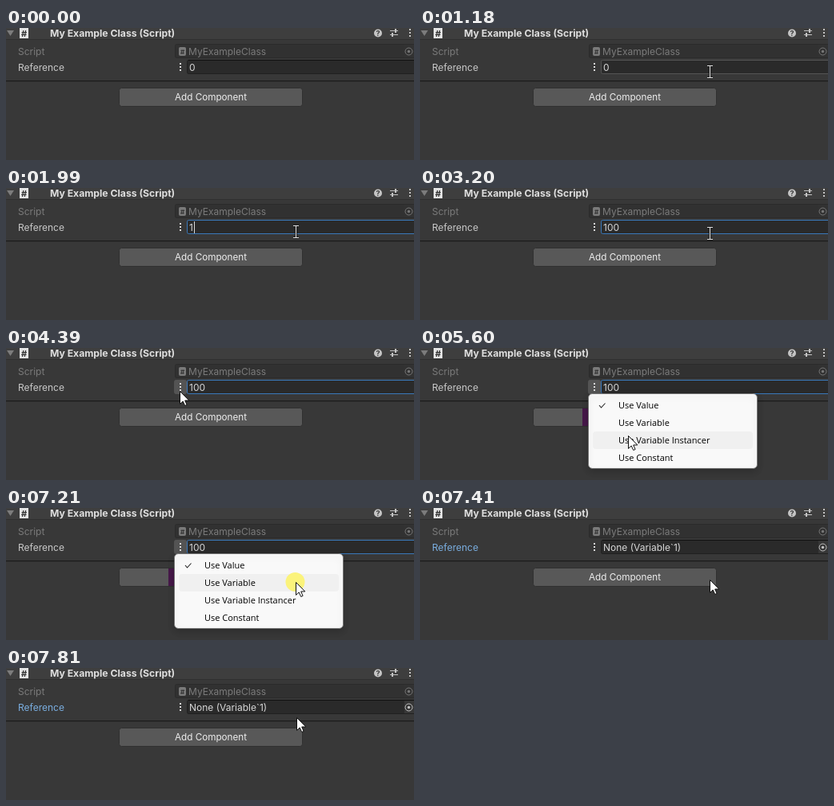
These frames come from a looping animation (510x166 px, 8 s). An HTML page with a canvas:

```html
<!DOCTYPE html>
<html lang="en">
<head>
<meta charset="utf-8">
<title>Inspector reference field</title>
<style>
html, body { margin: 0; width: 100%; height: 100%; overflow: hidden; background: #383838; }
canvas { display: block; }
</style>
</head>
<body>
<canvas id="stage" width="510" height="166"></canvas>
<script>
const ctx = document.getElementById('stage').getContext('2d');
const LOOP = 8000;
const UI = '12px Inter, sans-serif';
const MENU_FONT = '11px "Open Sans", "Noto Sans", sans-serif';
const MENU_ITEMS = ['Use Value', 'Use Variable', 'Use Variable Instancer', 'Use Constant'];

// Pointer samples: start time, x, y.
const POINTER = [
  [790, 430, 108], [990, 378, 74], [1180, 362, 55], [3200, 362, 57],
  [3400, 390, 70], [3590, 330, 78], [3790, 268, 76], [3990, 229, 66],
  [4190, 218, 59], [4390, 217, 54], [5200, 234, 82], [5400, 254, 104],
  [5600, 260, 110], [5800, 288, 107], [6010, 316, 101], [6210, 330, 96],
  [6410, 346, 95], [6610, 357, 94], [6810, 362, 93], [7410, 362, 90],
  [7610, 363, 72], [7810, 363, 62]
];
const VALUES = [[0, '0'], [1990, '1'], [2190, '10'], [2390, '100'], [7410, 'None (Variable`1)']];

const latest = (keys, t) => keys.filter(key => key[0] <= t).pop();

function rect(x, y, w, h, color) {
  ctx.fillStyle = color;
  ctx.fillRect(x, y, w, h);
}

function box(x, y, w, h, radius, fill, border = fill) {
  ctx.beginPath();
  ctx.roundRect(x + .5, y + .5, w - 1, h - 1, radius);
  ctx.fillStyle = fill;
  ctx.fill();
  ctx.lineWidth = 1;
  ctx.strokeStyle = border;
  ctx.stroke();
}

function disc(x, y, r, color) {
  ctx.beginPath();
  ctx.arc(x, y, r, 0, 2 * Math.PI);
  ctx.fillStyle = color;
  ctx.fill();
}

function ring(x, y, r, color) {
  ctx.beginPath();
  ctx.arc(x, y, r, 0, 2 * Math.PI);
  ctx.lineWidth = 1;
  ctx.strokeStyle = color;
  ctx.stroke();
}

function text(string, x, y, color, font = UI, align = 'left') {
  ctx.font = font;
  ctx.textAlign = align;
  ctx.fillStyle = color;
  ctx.fillText(string, x, y);
}

function line(points, color, width = 1) {
  ctx.beginPath();
  points.forEach(([x, y]) => ctx.lineTo(x, y));
  ctx.lineWidth = width;
  ctx.strokeStyle = color;
  ctx.stroke();
}

function dots(x, y, gap, color) {
  for (let i = -1; i <= 1; i++) rect(x - 1, y - 1 + i * gap, 2, 2, color);
}

function picker(y, color, fill) {
  rect(498, y - 8, 12, 16, fill);
  ring(503.5, y + .5, 4.5, color);
  disc(503.5, y + .5, 1.7, color);
}

function drawHeader() {
  rect(0, 0, 510, 14, '#3e3e3e');
  rect(0, 14, 510, 1, '#303030');
  ctx.beginPath();
  ctx.moveTo(1, 3);
  ctx.lineTo(10, 3);
  ctx.lineTo(5.5, 10);
  ctx.fillStyle = '#7c7c7c';
  ctx.fill();
  rect(17, 0, 11, 13, '#e4e4e4');
  text('#', 22.5, 11, '#333', 'bold 11px Inter, sans-serif', 'center');
  text('My Example Class (Script)', 55, 11, '#dedede', 'bold 12.2px Inter, sans-serif');
  disc(465, 6.5, 5, '#c4c4c4');
  text('?', 465, 10, '#383838', 'bold 9px Inter, sans-serif', 'center');
  line([[480, 3.5], [490, 3.5]], '#c4c4c4');
  line([[480, 8.5], [490, 8.5]], '#c4c4c4');
  rect(486, 1, 2, 5, '#c4c4c4');
  rect(482, 6, 2, 5, '#c4c4c4');
  dots(505, 6, 4, '#c4c4c4');
}

function drawScriptRow() {
  text('Script', 15, 34, '#7b7b7b');
  box(211, 20, 304, 18, 2, '#313131', '#2b2b2b');
  box(216, 24, 9, 11, 1, '#7a7a7a');
  text('#', 220.5, 33, '#333', 'bold 8px Inter, sans-serif', 'center');
  text('MyExampleClass', 228, 34, '#7b7b7b');
  picker(29, '#777', '#323232');
}

function drawReferenceRow(t) {
  const assigned = t >= 7410;
  const focused = t >= 1380 && !assigned;
  const hovered = t >= 1180 && t < 1380;
  const value = latest(VALUES, t)[1];

  text('Reference', 15, 54, assigned ? '#7aaee0' : '#c9c9c9');
  if (t >= 4390 && !assigned) box(210, 40, 16, 18, 2, '#545454');
  dots(218, 49, 4, '#d8d8d8');
  box(226, 40, 290, 18, 2, '#2a2a2a', focused ? '#3a79bb' : hovered ? '#555' : '#202020');
  if (!focused && !hovered) rect(228, 40, 282, 1, '#111');
  if (t >= 1380 && t < 1990) rect(229, 42, 8, 15, '#3d6a9e');
  text(value, 229, 54, '#d8d8d8');
  if (t >= 1990 && t < 2580) rect(230 + Math.round(ctx.measureText(value).width), 42, 1, 15, '#d8d8d8');
  if (assigned) picker(49, '#c4c4c4', '#373737');
}

function drawButton(t, menuOpen) {
  const hovered = t >= 3590 && t < 3990;
  box(141, 75, 230, 24, 3, hovered ? '#676767' : '#585858', '#303030');
  if (menuOpen) rect(203, 76, 8, 22, '#47194a');
  else text('Add Component', 256, 91, '#eee', '11.7px Inter, sans-serif', 'center');
}

function drawMenu(pointerY) {
  ctx.save();
  ctx.shadowColor = 'rgba(0, 0, 0, .2)';
  ctx.shadowBlur = 8;
  ctx.shadowOffsetY = 3;
  box(210, 57, 212, 95, 5, '#f9f9f9', '#757575');
  ctx.restore();
  const hovered = Math.floor((pointerY - 61) / 22);
  MENU_ITEMS.forEach((item, i) => {
    const y = 61 + 22 * i;
    if (i === hovered) box(216, y, 200, 22, 3, '#f0f0f0');
    text(item, 248, y + 15, '#000', MENU_FONT);
  });
  line([[224, 72], [226.5, 75], [231.5, 69.5]], '#222', 1.1);
}

function drawIBeam(x, y) {
  const strokes = (color, width) => {
    line([[x + .5, y - 7], [x + .5, y + 7]], color, width);
    for (const end of [-7.5, 7.5]) line([[x - 3, y + end], [x + 4, y + end]], color, width);
  };
  strokes('#222', 2.5);
  strokes('#e0e0e0', 1);
}

function drawArrow(x, y) {
  ctx.save();
  ctx.translate(x + .5, y + .5);
  ctx.beginPath();
  [[0, 0], [0, 16], [3.7, 12.5], [6.2, 18], [8.6, 17], [6.2, 11.5], [11.3, 11.5]]
    .forEach(point => ctx.lineTo(...point));
  ctx.closePath();
  ctx.fillStyle = '#fff';
  ctx.fill();
  ctx.lineWidth = 1;
  ctx.strokeStyle = '#111';
  ctx.stroke();
  ctx.restore();
}

function drawPointer(t, x, y) {
  if (t >= 7210 && t < 7410) disc(x - .5, y, 12, '#fbf37b');
  if (t >= 1180 && t < 3400) drawIBeam(x, y);
  else drawArrow(x, y);
}

function draw(t) {
  const pointer = latest(POINTER, t);
  const menuOpen = t >= 4800 && t < 7410;
  rect(0, 0, 510, 166, '#383838');
  drawHeader();
  drawScriptRow();
  drawReferenceRow(t);
  rect(0, 66, 510, 1, '#1b1b1b');
  rect(0, 67, 510, 1, '#303030');
  drawButton(t, menuOpen);
  if (menuOpen) drawMenu(pointer[2]);
  if (pointer) drawPointer(t, pointer[1], pointer[2]);
}

const start = performance.now();
function tick() {
  draw((performance.now() - start) % LOOP);
  requestAnimationFrame(tick);
}
tick();
</script>
</body>
</html>
```
